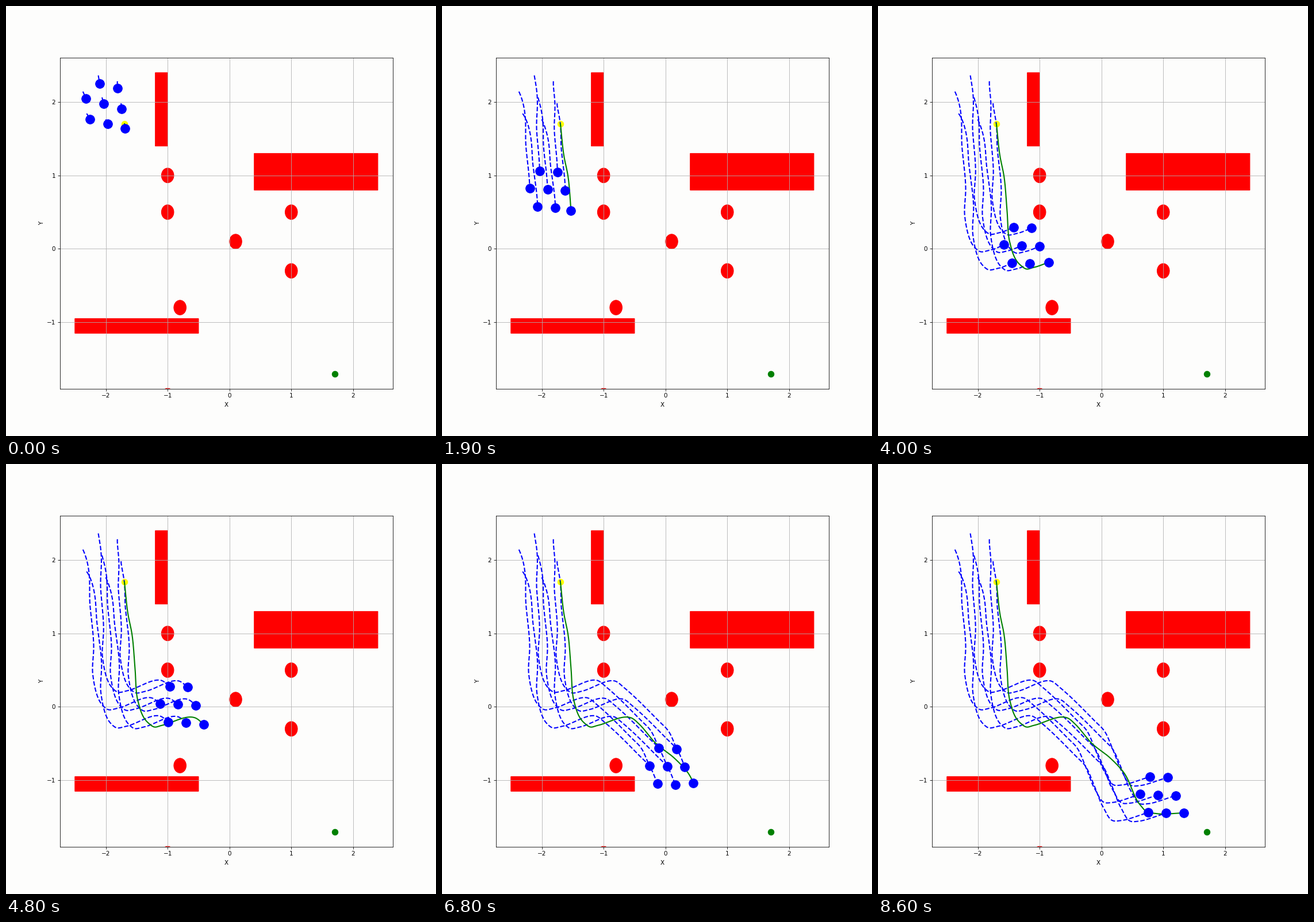
A matplotlib script that plays this animation: 748x748 px, repeating every 8.7 s.

```python
import numpy as np
import matplotlib.pyplot as plt
from matplotlib.animation import FuncAnimation
from matplotlib.patches import Circle, Rectangle

SIZE, DPI = 748, 74.8
FRAMES, STEP_MS = 87, 100
XLIM, YLIM = (-2.745, 2.645), (-1.905, 2.605)
PAPER = "#fdfdfc"
GAP = 31  # spacing of the formation in pixels

# Turning points as (frame, x, y), in stage pixels with y down.
LEADER = [(-1, 206, 205), (6, 212, 260), (11, 219, 295), (19, 224.5, 356.5),
          (25.5, 229, 410), (32, 247, 450), (34, 258, 457.5), (36, 270, 455),
          (45.5, 332, 443), (48, 344, 453.5), (54, 372, 486), (60, 404, 511.5),
          (65, 427, 536), (74, 456, 593), (77, 469, 605.5), (79, 483, 608),
          (86, 532, 607)]
FLOCK = [(-1, 167, 159), (0, 170, 170), (10, 177, 249), (19, 183.5, 319),
         (25, 182, 368), (32, 199, 421), (34, 209, 428.5), (36.5, 225, 426),
         (45.5, 287, 409), (48, 299, 418.5), (60, 358, 475), (64, 378, 496),
         (68, 391.5, 526), (74, 408, 566), (78, 425, 590), (80, 438, 590),
         (86, 487, 575.5)]

plt.rcParams["font.family"] = "DejaVu Sans"
fig = plt.figure(figsize=(SIZE / DPI, SIZE / DPI), dpi=DPI, facecolor=PAPER)
ax = fig.add_axes([0.125, 0.11, 0.775, 0.77], facecolor=PAPER)
ax.set(xlim=XLIM, ylim=YLIM, xticks=range(-2, 3), yticks=range(-1, 3))
ax.set_xlabel("X", labelpad=5.5)
ax.set_ylabel("Y")
ax.grid(True)


def to_data(x, y):
    """Stage pixels (y down) to axes coordinates."""
    return (XLIM[0] + (x / SIZE - 0.125) / 0.775 * (XLIM[1] - XLIM[0]),
            YLIM[1] - (y / SIZE - 0.12) / 0.77 * (YLIM[1] - YLIM[0]))


def glide(keys, t):
    """Smooth cubic motion through timed points."""
    k = np.array(keys, float)
    kt, pts = k[:, 0], k[:, 1:]
    slope = np.gradient(pts, kt, axis=0)
    i = np.clip(np.searchsorted(kt, t, side="right") - 1, 0, len(kt) - 2)
    h = (kt[i + 1] - kt[i])[:, None]
    u = (t - kt[i])[:, None] / h
    p = ((1 + 2 * u) * (1 - u) ** 2 * pts[i] + u * (1 - u) ** 2 * h * slope[i]
         + u * u * (3 - 2 * u) * pts[i + 1] + u * u * (u - 1) * h * slope[i + 1])
    return p.T


def follow(dx, dy, t):
    """A place in the flock, which starts wide and tilted and then settles."""
    tilt = np.radians(2 + 15 * np.exp(-(t + 1) / 8))
    spread = 1 + 0.12 * np.exp(-(t + 1))
    x, y = glide(FLOCK, t)
    return (x + spread * (dx * np.cos(tilt) - dy * np.sin(tilt)),
            y + spread * (dx * np.sin(tilt) + dy * np.cos(tilt)))


SUB = 4  # path samples per frame
times = np.arange(-SUB, (FRAMES - 1) * SUB + 1) / SUB

# Rows of two, three and two; the leader fills the end of the last row.
slots = [((col - (n - 1) / 2) * GAP, row * GAP)
         for row, n in ((-1, 2), (0, 3), (1, 2)) for col in range(n)]
paths = [to_data(*follow(dx, dy, times)) for dx, dy in slots]
paths.append(to_data(*glide(LEADER, times)))

for x, y, w, h in [(-1.2, 1.4, 0.2, 1), (0.4, 0.8, 2, 0.5), (-2.5, -1.15, 2, 0.2)]:
    ax.add_patch(Rectangle((x, y), w, h, color="red", snap=False))
for spot in [(-1, 1), (-1, 0.5), (1, 0.5), (0.1, 0.1),
             (1, -0.3), (-0.8, -0.8), (-1, -2)]:
    ax.add_patch(Circle(spot, 0.1, color="red"))

ax.plot(-1.7, 1.7, "o", color="yellow", ms=10, snap=False)
ax.plot(1.7, -1.7, "o", color="green", ms=10, snap=False)

trails = [ax.plot([], [], "--", color="blue", lw=2)[0] for _ in slots]
trails += ax.plot([], [], color="green", lw=2)
dots = [ax.plot([], [], "o", color="blue", ms=15, snap=False)[0] for _ in paths]


def update(frame):
    end = (frame + 1) * SUB + 1
    for (x, y), line, dot in zip(paths, trails, dots):
        line.set_data(x[:end], y[:end])
        dot.set_data(x[end - 1:end], y[end - 1:end])
    return trails + dots


anim = FuncAnimation(fig, update, frames=FRAMES, interval=STEP_MS,
                     init_func=lambda: update(0), repeat=True, repeat_delay=0)
plt.show()
```
